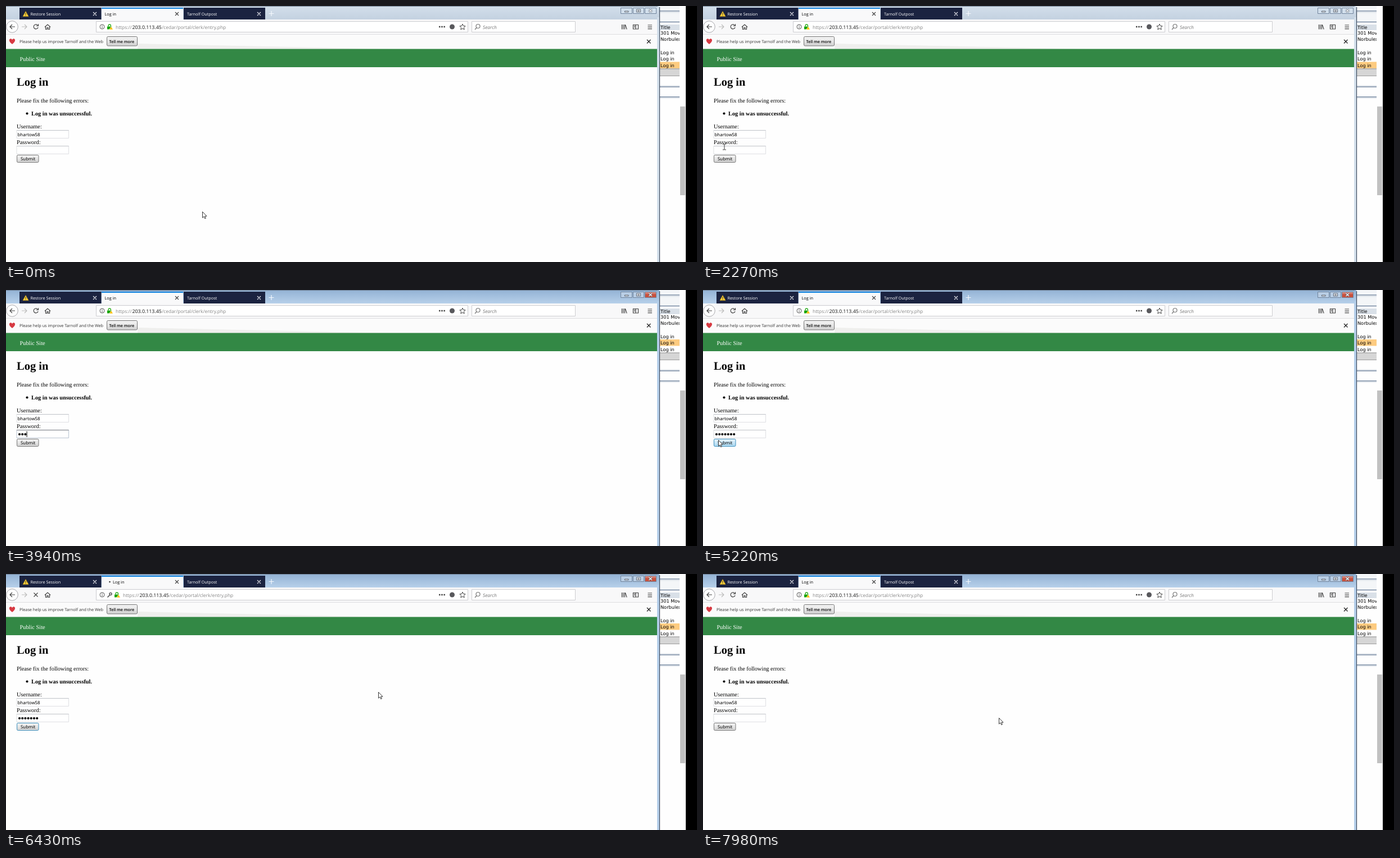
These frames come from a looping animation (1229 by 456 pixels, 8000 ms). An HTML page:

```html
<!DOCTYPE html>
<html lang="en">
<head>
<meta charset="utf-8">
<title>Log in</title>
<style>
html, body { margin: 0; width: 100%; height: 100%; overflow: hidden; background: #fff; }
svg { display: block; width: 100%; height: 100%; }
text { text-rendering: geometricPrecision; white-space: pre; }
.ui { font: 7.3px "Open Sans", "Noto Sans", sans-serif; }
.addr { font: 8.4px "Open Sans", "Noto Sans", sans-serif; }
.field { font: 7.9px "Noto Sans", "Open Sans", sans-serif; }
.page { font: 10.35px "Liberation Serif", serif; }
.table { font: 8.2px "DejaVu Sans", sans-serif; }
.line { fill: none; stroke: #444; stroke-width: 1.2; }
</style>
</head>
<body>
<svg id="stage" viewBox="0 0 1229 456">
  <defs>
    <linearGradient id="idle" x2="0" y2="1"><stop stop-color="#d3dfeb"/><stop offset="1" stop-color="#c3d1e0"/></linearGradient>
    <linearGradient id="live" x2="0" y2="1"><stop stop-color="#93b2d4"/><stop offset="1" stop-color="#b7d0ea"/></linearGradient>
    <linearGradient id="grey" x2="0" y2="1"><stop stop-color="#f4f4f4"/><stop offset=".5" stop-color="#e6e6e6"/><stop offset="1" stop-color="#cfcfcf"/></linearGradient>
    <linearGradient id="blue" x2="0" y2="1"><stop stop-color="#e8f5fc"/><stop offset=".5" stop-color="#c9e7f8"/><stop offset="1" stop-color="#a6d5ef"/></linearGradient>
    <linearGradient id="red" x2="0" y2="1"><stop stop-color="#e3a097"/><stop offset=".5" stop-color="#c84f3c"/><stop offset="1" stop-color="#c9523d"/></linearGradient>
    <clipPath id="list"><path d="M1163 43h35v70h-35z"/></clipPath>
  </defs>
  <rect width="1229" height="456" fill="#fefefe"/>

  <!-- window behind -->
  <g id="behind">
    <path d="M1163 0h35v9h-35zM1163 11h35v17h-35z" fill="#f4f6f8"/>
    <path d="M1163 33h35v10h-35z" fill="#d9e0e8"/>
    <path d="M1163 111h35v13h-35z" fill="#d6d6d6"/>
    <path d="M1163 112h35M1163 124.500h35" stroke="#9a9a9a"/>
    <path d="M1163 9h35M1163 28.500h35M1163 144h35M1163 162h35" stroke="#7486a0" stroke-width="1.600"/>
    <path d="M1163 11.500h35M1163 142h35M1163 164h35" stroke="#cfd6df"/>
    <rect id="row" x="1163" width="35" height="11.500" fill="#fdcb80"/>
    <g class="table" clip-path="url(#list)">
      <text x="1164" y="50.500">301 Moved</text><text x="1164" y="62">Norbulex</text>
      <text x="1164" y="85.500">Log in</text><text x="1164" y="97">Log in</text><text x="1164" y="108.500">Log in</text>
    </g>
    <text class="table" x="1164" y="41">Title</text>
    <path d="M1198 0h11v456h-11z" fill="#fefefe"/>
    <path d="M1199 179h9v158h-9z" fill="#c1c1c1"/>
    <path d="M1209 0h20v456h-20z"/>
  </g>

  <!-- frame and tabs -->
  <rect id="bar" width="1162" height="24"/>
  <rect id="edge" x="1158" y="20" width="4" height="436"/>
  <path d="M1162.500 2V456" stroke="#3c4a5c" stroke-width="1.200"/>
  <path d="M0 .500H1159" stroke="#6f7f92"/>
  <path d="M24 3h145.500v21H24zM316 3h145v21H316z" fill="#1b2340"/>
  <path d="M170 3h145v21H170z" fill="#f9f9fa"/>
  <path d="M170 3h145v2H170z" fill="#1485e0"/>
  <path d="M35 9.500l5 9H30z" fill="#f8cf3c" stroke="#c99a10" stroke-width=".600"/>
  <path d="M35 12.500v3M35 16.500v1" stroke="#222"/>
  <g class="ui">
    <text x="43.500" y="17" fill="#fff">Restore Session</text>
    <text id="tab" y="17">Log in</text>
    <text x="322" y="17" fill="#fff">Tarnolf Outpost</text>
  </g>
  <circle id="busy" cx="184.500" cy="14" r="1.300" fill="#333"/>
  <path d="M155 11l6 6m0-6l-6 6M447 11l6 6m0-6l-6 6" stroke="#e8e8ee" stroke-width="1.200"/>
  <path d="M301 11l6 6m0-6l-6 6" stroke="#444" stroke-width="1.200"/>
  <path d="M467.500 13.500h9M472 9v9" stroke="#f5f9fd" stroke-width="1.200"/>
  <g stroke="#71849c">
    <path id="buttons" d="M1093.500 3.500h20v10h-20zM1115.500 3.500h19v10h-19z"/>
    <path id="close" d="M1136.500 3.500h20v10h-20z"/>
  </g>
  <g fill="#fff" stroke="#4c5868" stroke-width=".900">
    <path d="M1100.500 9h6.500v2h-6.500zM1121.500 6h7v5h-7zM1123.500 8h3v1.200h-3z"/>
    <path d="M1143.500 6l5.500 5m0-5l-5.500 5" stroke-width="2.400"/>
    <path d="M1143.500 6l5.500 5m0-5l-5.500 5" stroke="#fff" stroke-width="1.200"/>
  </g>

  <!-- toolbar -->
  <path d="M0 24h1158v26H0z" fill="#f8f8f9"/>
  <circle cx="11" cy="37" r="10.300" fill="#fff" stroke="#a9a9ad"/>
  <path class="line" d="M16 37H7m4-4l-4 4 4 4" stroke-width="1.400"/>
  <path class="line" d="M28 37h9m-4-4l4 4-4 4" style="stroke:#bbb"/>
  <path id="reload" class="line" d="M56.500 34.500a4 4 0 1 0 .600 3.500M57.500 32v3.500H54" stroke-width="1.400"/>
  <path id="stop" class="line" d="M49.500 33.500l7 7m0-7l-7 7"/>
  <path class="line" d="M69 37.500l5-4.500 5 4.500M70.500 37v4.500h2.500v-3h2v3h2.500V37"/>
  <path d="M160.500 27.500h661v19h-661zM828.500 27.500h184v19h-184z" fill="#fff" stroke="#ccccd0"/>
  <circle class="line" cx="171" cy="37" r="4" style="stroke-width:.9"/>
  <path d="M171 36.300v3M171 34.400v1" stroke="#444"/>
  <path id="key" d="M180.500 41.500l4-4" stroke="#555" stroke-width="1.700"/>
  <circle id="keyHead" cx="186" cy="35.500" r="2" fill="none" stroke="#555" stroke-width="1.500"/>
  <g id="site">
    <path d="M182 36.500v-1.500a2.200 2.200 0 0 1 4.400 0v1.500" fill="none" stroke="#12a300" stroke-width="1.200"/>
    <path d="M180 36.500h8v5h-8z" fill="#12a300"/>
    <path d="M187 36.500l3.300 5.500h-6.600z" fill="#ffbf00" stroke="#fff" stroke-width=".500"/>
    <g class="addr" fill="#858585">
      <text x="195" y="40.500">https://</text>
      <text x="224.500" y="40.500" fill="#111" style="font-size:8.8px">203.0.113.45</text>
      <text x="277.300" y="40.500">/cedar/portal/clerk/entry.php</text>
    </g>
  </g>
  <path d="M770 37h2.500m1.700 0h2.500m1.700 0h2.500" stroke="#444" stroke-width="2.300"/>
  <circle cx="793.500" cy="37" r="4.500" fill="#58585c"/>
  <path class="line" d="M812 32l1.500 3.400 3.600.400-2.700 2.500.800 3.700-3.200-1.900-3.200 1.900.800-3.700-2.700-2.500 3.600-.400z" style="stroke-width:1"/>
  <circle class="line" cx="839.500" cy="36" r="3.500" style="stroke:#777"/>
  <path class="line" d="M837 38.500l-3 3.500" style="stroke:#777"/>
  <text class="addr" x="848" y="40.500" fill="#777" font-style="italic" style="font-style:italic">Search</text>
  <path class="line" d="M1095.500 33v8.500M1098 33v8.500M1100.500 33v8.500M1101.500 33.500l2.700 8"/>
  <path class="line" d="M1115.500 33.500h9v7.500h-9zM1120 33.500V41M1117 35.500h2M1117 37.500h2"/>
  <path class="line" d="M1141.500 34h7.500M1141.500 37.300h7.500M1141.500 40.600h7.500"/>

  <!-- notice -->
  <path d="M0 50h1158v27H0z" fill="#fbfbfb"/>
  <path d="M234 67L690 77H234z" fill="#efefed"/>
  <path d="M0 50.500H1158" stroke="#dedee0"/>
  <path d="M11 68C3 62 6 57.500 9 58.200Q10.500 58.600 11 60.300Q11.500 58.600 13 58.200C16 57.500 19 62 11 68z" fill="#d73a42"/>
  <g class="ui">
    <text x="24" y="66" fill="#333">Please help us improve Tarnolf and the Web</text>
    <rect x="179.500" y="54.500" width="54" height="16.500" rx="2" fill="url(#grey)" stroke="#777"/>
    <text x="183.500" y="65.700" font-weight="600" style="font-weight:600;font-size:7.15px">Tell me more</text>
  </g>
  <path d="M1140 60l6.500 6.500m0-6.500l-6.500 6.500" stroke="#222" stroke-width="1.300"/>

  <!-- page -->
  <path d="M0 76.500h1158V109H0z" fill="#338845"/>
  <g class="page">
    <text x="24.500" y="98" fill="#fff">Public Site</text>
    <text x="19" y="142" style="font-weight:700;font-size:20.5px">Log in</text>
    <text x="19" y="171.500">Please fix the following errors:</text>
    <circle cx="37.500" cy="191.500" r="2.100"/>
    <text x="45" y="195" style="font-weight:700">Log in was unsuccessful.</text>
    <text x="19" y="218">Username:</text>
    <text x="19" y="246">Password:</text>
  </g>
  <path d="M19 221.500h92.500v14H19z" fill="#fff" stroke="#dedfe3"/>
  <path d="M19 221.500h92.500" stroke="#bfc2c8"/>
  <text class="field" x="20.500" y="232">bhartow58</text>
  <path id="box" d="M19 249.500h92.500v14H19z" fill="#fff"/>
  <path id="boxTop" d="M19 249.500h92.500"/>
  <g id="dots"></g>
  <path id="caret" d="M0 251.500v10.500" stroke="#000"/>
  <rect id="submit" x="19.500" y="265.500" width="38.500" height="13" rx="1.800"/>
  <text class="field" x="26" y="275">Submit</text>

  <path id="arrow" d="M.500 .500v10.700l2.500-2.300 1.700 3.800 1.700-.700-1.600-3.700h3.200z" fill="#fff" stroke="#222" stroke-width=".900"/>
  <path id="beam" d="M-3-5h2.300l.700.600.700-.600H3M0-4.500v9M-3 5h2.300l.700-.600.700.600H3" fill="none" stroke="#222" stroke-width=".900"/>
</svg>
<script>
const LOOP = 8000;
const $ = id => document.getElementById(id);
const set = (id, name, value) => $(id).setAttribute(name, value);
const show = (id, on) => set(id, 'visibility', on ? 'visible' : 'hidden');
const move = (id, x, y = 0) => set(id, 'transform', `translate(${x} ${y})`);

// Pointer stops, spread evenly from the first to the last time of each run.
const runs = [
  [0, 0, [[349, 366]]],
  [500, 1450, [[347, 382], [336, 404], [300, 394], [250, 362], [200, 325], [150, 288], [115, 264], [95, 252]]],
  [1980, 2910, [[70, 252], [48, 251], [38, 251], [40, 252], [42, 253], [44, 254], [45, 254], [48, 255]]],
  [3050, 3050, [null]],
  [4791, 5220, [[48, 256], [39, 262], [30, 273], [27, 267]]],
  [5770, 6700, [[40, 348], [120, 346], [230, 335], [335, 317], [595, 255], [662, 210], [540, 180], [395, 160]]],
  [6840, 7840, [[328, 167], [268, 155], [160, 135], [75, 118], [48, 108], [130, 120], [245, 147], [336, 151]]],
  [7980, 7980, [[526, 256]]]
];
const keys = [3330, 3490, 3790, 4220, 4363, 4506, 4649];

$('dots').innerHTML = keys.map((_, i) => `<circle cx="${24 + i * 5.2}" cy="257" r="2.1"/>`).join('');

function pointer(t) {
  const [from, to, stops] = runs.filter(run => run[0] <= t).pop();
  const last = stops.length - 1;
  const step = to > from ? Math.floor((t - from) / (to - from) * last + .1) : 0;
  return stops[Math.min(step, last)];
}

function draw(t) {
  const active = t >= 2379;
  const loading = t >= 5770 && t < 6560;
  const saved = t >= 5770 && t < 7400;
  const focus = active && t < 5210;
  const typed = t < 6560 ? keys.filter(k => k <= t).length : 0;
  const at = pointer(t);
  const inside = (x, y, w, h) => at && at[0] >= x && at[0] <= x + w && at[1] >= y && at[1] <= y + h;
  const overField = inside(19, 249, 93, 15);
  const hover = inside(19, 265, 39, 14);

  set('bar', 'fill', active ? 'url(#live)' : 'url(#idle)');
  set('edge', 'fill', active ? '#b5cfea' : '#d3dfeb');
  set('buttons', 'fill', active ? '#b9cee5' : '#d2dfec');
  set('close', 'fill', active ? 'url(#red)' : '#d2dfec');
  set('row', 'y', t < 3330 ? 99.5 : 88);

  set('tab', 'x', loading ? 190 : 175.5);
  show('busy', loading);
  show('stop', loading);
  show('reload', !loading);
  show('key', saved);
  show('keyHead', saved);
  move('site', saved ? 13 : 0);

  set('box', 'stroke', focus ? '#b9c4d2' : '#dedfe3');
  set('boxTop', 'stroke', focus ? '#70757d' : '#bfc2c8');
  [...$('dots').children].forEach((dot, i) => dot.setAttribute('visibility', i < typed ? 'visible' : 'hidden'));
  show('caret', focus);
  move('caret', 21.5 + typed * 5.2);
  set('submit', 'fill', hover ? 'url(#blue)' : 'url(#grey)');
  set('submit', 'stroke', hover || loading ? '#3c8fbd' : '#777');

  show('arrow', at && !overField);
  show('beam', overField);
  if (at) move(overField ? 'beam' : 'arrow', ...at);
}

const start = performance.now();
function tick() {
  draw((performance.now() - start) % LOOP);
  requestAnimationFrame(tick);
}
tick();
</script>
</body>
</html>
```
